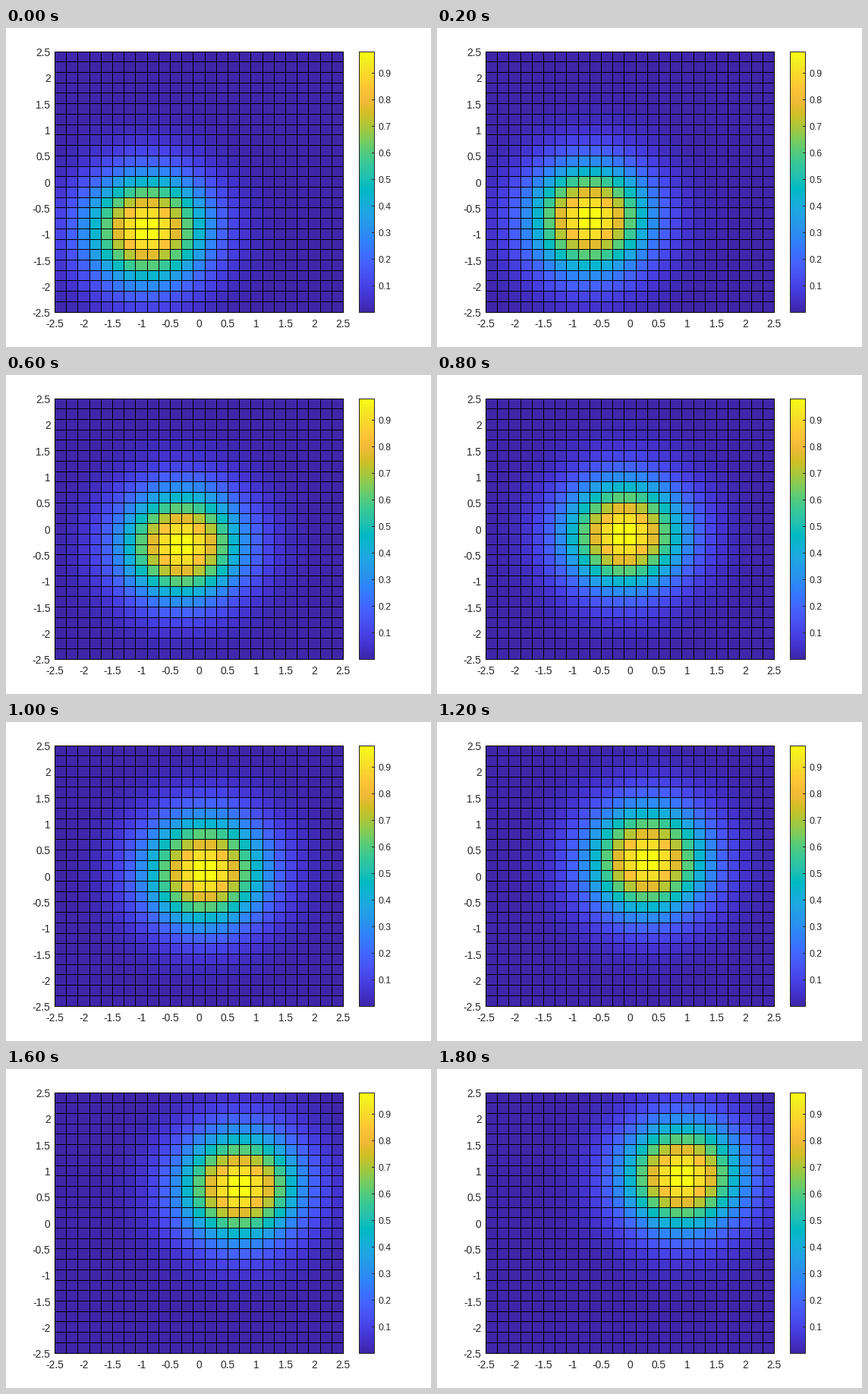
A matplotlib script for the animation above (3000 ms loop, 560 by 420 pixels).

```python
import numpy as np
import matplotlib.pyplot as plt
from matplotlib.animation import FuncAnimation
from matplotlib.colors import LinearSegmentedColormap

WIDTH, HEIGHT, DPI = 560, 420, 100
LEFT, RIGHT, TOP, BOTTOM = 64.5, 444.5, 31.1, 374.1
BAR_LEFT, BAR_RIGHT = 465, 485
CELLS, LIMIT = 25, 2.5
STEP_MS, FRAMES, LAST_STEP = 200, 15, 9
PEAK = np.exp(-0.02)
PIXEL = 72 / DPI
AXIS_FONT, BAR_FONT = 13.7, 12.3
INK = (0.15, 0.15, 0.15)

PARULA = LinearSegmentedColormap.from_list("parula", [
    "#3E26A8", "#4332CB", "#4741E5", "#4852F4", "#4563FD", "#3875FE",
    "#2E87F7", "#2797EB", "#20A5E3", "#12B1D6", "#02BAC3", "#24C1AE",
    "#37C897", "#57CC7A", "#81CC59", "#ABC739", "#D1BF27", "#F0BA36",
    "#FEC338", "#FAD62D", "#F5E924", "#F9FB15"])

plt.rcParams["font.family"] = "Liberation Sans"
fig = plt.figure(figsize=(WIDTH / DPI, HEIGHT / DPI), dpi=DPI, facecolor="white")
ax = fig.add_axes([0, 0, 1, 1])
ax.set_axis_off()


def label(x, y, value, size, align):
    ax.text(x, y, f"{value:g}", fontsize=size * PIXEL, color=INK,
            ha=align, va="baseline")


def line(xs, ys, color):
    """One-pixel line through the centres of the given pixels."""
    ax.plot(np.add(xs, 0.5), np.add(ys, 0.5), color=color, lw=PIXEL,
            snap=False, solid_capstyle="projecting", solid_joinstyle="miter")


def heights(step):
    # Each cell takes the value at its lower-left corner.
    centre = -1 + 0.2 * step
    nodes = np.linspace(-LIMIT, LIMIT, CELLS + 1)[:-1]
    bell = np.exp(-(nodes - centre) ** 2)
    return np.outer(bell[::-1], bell)


# Surface and its mesh lines, on whole pixels
cols = np.floor(np.linspace(LEFT, RIGHT, CELLS + 1))
rows = np.floor(np.linspace(TOP, BOTTOM, CELLS + 1))
top, bottom = rows[0], rows[-1]
surface = ax.pcolormesh(cols, rows, heights(0), cmap=PARULA, vmin=0, vmax=PEAK,
                        antialiased=False, edgecolors="none")
for x in cols:
    line([x, x], [top, bottom], "black")
for y in rows:
    line([cols[0], cols[-1]], [y, y], "black")

for tick in np.linspace(-LIMIT, LIMIT, 11):
    share = (tick + LIMIT) / (2 * LIMIT)
    label(LEFT + share * (RIGHT - LEFT) - 0.4, 393.5, tick, AXIS_FONT, "center")
    label(58.5, BOTTOM - share * (BOTTOM - TOP) + 6, tick, AXIS_FONT, "right")

# Colour bar
ax.imshow(np.linspace(1, 0, 256)[:, None], cmap=PARULA, aspect="auto",
          interpolation="nearest", extent=(BAR_LEFT, BAR_RIGHT, bottom, top))
line([BAR_LEFT, BAR_RIGHT, BAR_RIGHT, BAR_LEFT, BAR_LEFT],
     [top, top, bottom, bottom, top], INK)
for tick in np.arange(1, 10) / 10:
    y = bottom - tick / PEAK * (bottom - top)
    line([BAR_RIGHT - 3, BAR_RIGHT], [np.round(y)] * 2, INK)
    label(490.5, y + 5.2, tick, BAR_FONT, "left")

ax.set_xlim(0, WIDTH)
ax.set_ylim(HEIGHT, 0)


def update(frame):
    surface.set_array(heights(min(frame, LAST_STEP)))
    return [surface]


animation = FuncAnimation(fig, update, frames=FRAMES, interval=STEP_MS,
                          repeat=True, repeat_delay=0, blit=False)
plt.show()
```
